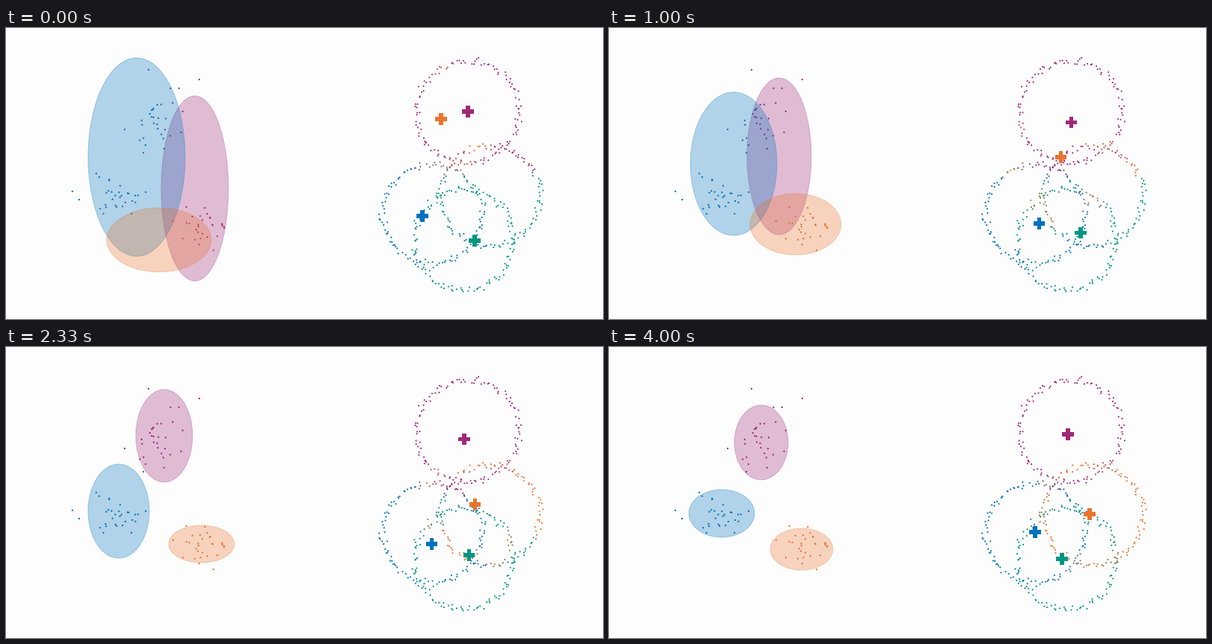
Recreate the animation shown at these times as a matplotlib script. Size 800x390 px, loop 4.33 s.

```python
import numpy as np
import matplotlib.pyplot as plt
from matplotlib.animation import FuncAnimation
from matplotlib.colors import to_rgb
from matplotlib.patches import Ellipse

W, H, DPI = 800, 390, 100
TICK, LOOP, STEPS = 10, 4330, 13
RADIUS = 66
PALETTE = np.array([to_rgb(c) for c in
                    ("#0072bd", "#a02878", "#eb732d", "#009682")])

rng = np.random.default_rng(4)


def track(keys, *poses):
    """Straight motion between key poses; one row per step."""
    steps = np.arange(STEPS)
    return np.array([np.interp(steps, keys, p) for p in zip(*poses)]).T


# Mixture components: centre and half axes (two standard deviations)
FIT = [0, 1, 3, 5, 7, 12]
blobs = [
    track(FIT, (175, 173, 65, 133), (173, 169, 61, 98), (167, 182, 58, 96),
          (159, 189, 55, 102), (151, 220, 41, 63), (151, 223, 44, 32)),
    track(FIT, (253, 215, 45, 124), (245, 213, 46, 104), (228, 172, 43, 105),
          (221, 112, 31, 62), (212, 119, 38, 62), (204, 128, 36, 50)),
    track(FIT, (205, 284, 70, 43), (224, 264, 67, 42), (250, 263, 61, 41),
          (263, 265, 44, 28), (262, 264, 44, 25), (258, 271, 42, 28)),
]

# Ring centres
MOVE = [0, 1, 5, 9, 12]
rings = [
    track(MOVE, (558, 252), (578, 255), (575, 269), (566, 259), (571, 248)),
    track(MOVE, (619, 112), (627, 125), (612, 128), (616, 119), (615, 117)),
    track(MOVE, (583, 122), (594, 142), (617, 204), (640, 218), (644, 224)),
    track(MOVE, (628, 285), (632, 271), (632, 278), (609, 280), (607, 284)),
]


def cluster(x, y, sx, sy, n=29):
    spread = np.clip(rng.normal(size=(n, 2)), -1.8, 1.8)
    return np.array([x, y]) + spread * [sx, sy]


def circle(x, y, r, n=122):
    angle = 2 * np.pi * (np.arange(n) + rng.normal(0, 0.7, n)) / n
    dist = r + np.clip(rng.normal(0, 2.5, n), -5, 5)
    return np.c_[x + dist * np.cos(angle), y + dist * np.sin(angle)]


outliers = [(191, 56), (259, 69), (159, 136), (89, 219), (98, 230), (278, 298)]
samples = np.vstack([cluster(208, 124, 16, 24), cluster(153, 222, 19, 15),
                     cluster(258, 265, 19, 14), outliers])
loops = np.vstack([circle(619, 112, 69), circle(649, 225, 67),
                   circle(572, 249, 67), circle(614, 284, 67)])


def blob_cost(blob):
    centre, axes = blob[:2], blob[2:]
    return 2 * (((samples - centre) / axes) ** 2).sum(1) + np.log(axes.prod())


def ring_cost(centre):
    gap = np.hypot(*(loops - centre).T) - RADIUS
    return gap ** 2 / 100


def blend(costs):
    """Mix the palette by each component's share of a point."""
    costs = np.array(costs)
    share = np.exp(costs.min(0) - costs)
    share /= share.sum(0)
    return share.T @ PALETTE[:len(costs)]


fig = plt.figure(figsize=(W / DPI, H / DPI), dpi=DPI, facecolor="#fdfdfd")
ax = fig.add_axes([0, 0, 1, 1])
ax.set(xlim=(0, W), ylim=(H, 0))
ax.axis("off")

ovals = [ax.add_patch(Ellipse((0, 0), 1, 1, color=color, alpha=0.3, lw=0.7,
                              zorder=z))
         for color, z in zip(PALETTE, (2, 1, 3))]
dots = ax.scatter(*samples.T, s=2.7, lw=0, zorder=5)
specks = ax.scatter(*loops.T, s=2.3, lw=0, zorder=5)
marks = ax.scatter([0] * 4, [0] * 4, s=132, marker="P", lw=0, c=PALETTE,
                   zorder=6)


def draw(tick):
    # three steps a second, switching on the nearest 10 ms
    step = int((tick * TICK + 4) * 3 // 1000)
    fits = [b[step] for b in blobs]
    for oval, (x, y, a, b) in zip(ovals, fits):
        oval.set(center=(x, y), width=2 * a, height=2 * b)
    dots.set_facecolor(blend([blob_cost(f) for f in fits]))

    centres = [r[step] for r in rings]
    specks.set_facecolor(blend([ring_cost(c) for c in centres]))
    marks.set_offsets(centres)
    return *ovals, dots, specks, marks


anim = FuncAnimation(fig, draw, frames=LOOP // TICK, interval=TICK,
                     repeat=True, repeat_delay=0)
plt.show()
```
